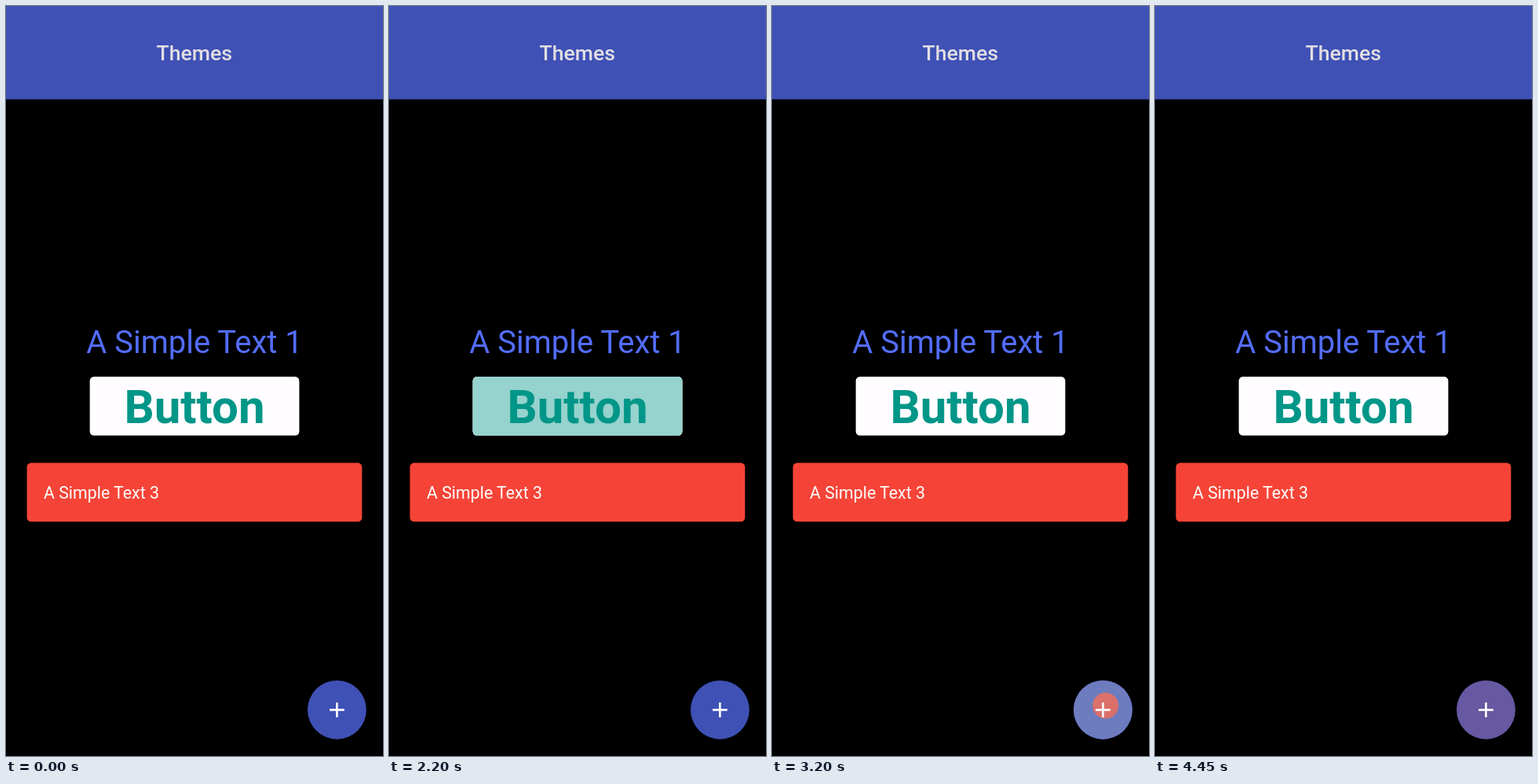
An HTML page that plays this animation: 480x953 px, repeating every 4.5 s.

```html
<!DOCTYPE html>
<html lang="en">
<head>
<meta charset="utf-8">
<title>Themes</title>
<style>
  html, body { margin: 0; width: 100%; height: 100%; overflow: hidden; background: #000; }
  svg { display: block; width: 480px; height: 953px; }
  text { font-family: Roboto, sans-serif; }
</style>
</head>
<body>
<svg viewBox="0 0 480 953">
  <defs>
    <clipPath id="buttonClip"><rect x="106.7" y="471" width="266.7" height="74.7" rx="5.3"/></clipPath>
    <clipPath id="fabClip"><circle cx="421.4" cy="894.3" r="37.4"/></clipPath>
  </defs>

  <rect width="480" height="953"/>
  <rect width="480" height="118.6" fill="#3f51b5"/>
  <text x="239.8" y="68.8" font-size="26.67" font-weight="500" text-anchor="middle" fill="#e2dfe4">Themes</text>
  <text x="240" y="441" font-size="40" text-anchor="middle" fill="#536dfe">A Simple Text 1</text>

  <rect x="106.7" y="471" width="266.7" height="74.7" rx="5.3" fill="#fffdff"/>
  <g id="buttonInk" clip-path="url(#buttonClip)" opacity="0">
    <rect x="106" y="470" width="269" height="77" fill="#c1e5e2"/>
    <circle cx="280" cy="523" r="0" fill="#96d2ce"/>
  </g>
  <text x="240" y="529.5" font-size="60" font-weight="700" text-anchor="middle" fill="#009688">Button</text>

  <rect x="26.6" y="580.6" width="426.7" height="74.6" rx="5.3" fill="#f54437"/>
  <text x="48" y="625.6" font-size="21.33" fill="#fff">A Simple Text 3</text>

  <circle cx="421.4" cy="894.3" r="37.4" fill="#3f51b5"/>
  <g id="fabInk" clip-path="url(#fabClip)" opacity="0">
    <rect x="383" y="856" width="77" height="77" fill="#6d7bbf"/>
    <circle cx="424.7" cy="889" r="0" fill="#db706b"/>
  </g>
  <path d="M412 894.3h18.7M421.35 885v18.7" stroke="#fff" stroke-width="2.67"/>
</svg>
<script>
  const LOOP = 4500;
  const STEP = 50;
  const clamp = (v, max = 1) => Math.min(max, Math.max(0, v));
  const ramp = (t, [from, to]) => clamp((t - from) / (to - from));

  // Each press: a highlight fades in, a splash grows for one second, both fade out.
  const presses = [
    { id: 'buttonInk', start: 1150, radius: 181, fadeIn: [1205, 1400], fadeOut: [2330, 2640] },
    { id: 'fabInk', start: 2920, radius: 59, fadeIn: [2920, 3120], fadeOut: [4140, 4555] }
  ].map(press => {
    const group = document.getElementById(press.id);
    return { ...press, group, splash: group.querySelector('circle') };
  });

  function draw(t) {
    for (const { group, splash, start, radius, fadeIn, fadeOut } of presses) {
      group.setAttribute('opacity', ramp(t, fadeIn) * (1 - ramp(t, fadeOut)));
      splash.setAttribute('r', radius * clamp((t - start) / 1000));
    }
  }

  const origin = performance.now();
  function tick() {
    const elapsed = (performance.now() - origin) % LOOP;
    draw(Math.floor(elapsed / STEP) * STEP);
    requestAnimationFrame(tick);
  }
  tick();
</script>
</body>
</html>
```
